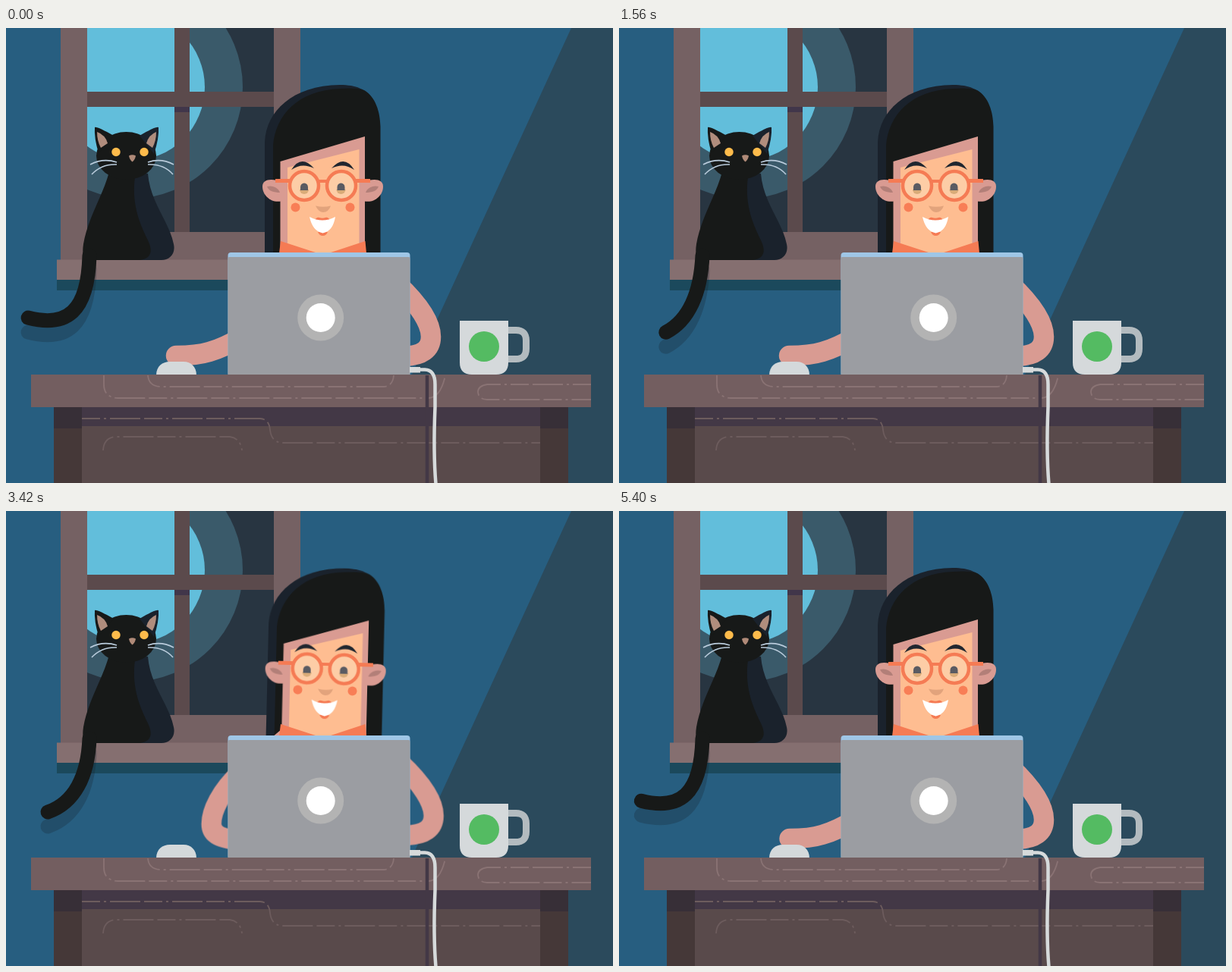
An HTML page for the animation above (5430 ms loop, 800 by 600 pixels).

```html
<!DOCTYPE html>
<html lang="en">
<head>
<meta charset="utf-8">
<title>Late night at the desk</title>
<style>
  html, body { margin: 0; width: 100%; height: 100%; overflow: hidden; background: #275e80; }
  svg { display: block; width: 100vw; height: 100vh; }

  :root {
    --loop: 5430ms;
    --in: cubic-bezier(.12, 0, .39, 0);
    --out: cubic-bezier(.61, 1, .88, 1);
    /* tail poses */
    --left: path("M110 300C108 375 80 395 29 382");
    --far-left: path("M110 300C106 370 72 397 14 384");
    --near-left: path("M110 300C108 370 84 396 36 385");
    --rising: path("M110 300C104 340 85 385 58 424");
    --down: path("M110 300C106 345 106 390 109 431");
    --right: path("M109 300C103 365 140 400 182 401");
    --trail: path("M110 300C108 350 90 385 55 397");
    /* arm poses */
    --rest: path("M310 408C295 417 282 423 268 427C255 431 240 432 224 432");
    --push: path("M312 412C300 418 288 424 275 428C264 431 252 432 236 432");
    --pull: path("M310 401C296 410 279 420 263 426C248 431 232 432 216 432");
    --type: path("M310 345C283 370 271 396 271 413C271 427 283 433 308 434");
  }

  .skin { fill: #d99b92; }
  .arm { fill: none; stroke: #d99b92; stroke-width: 26.5; stroke-linecap: round; }
  .tail {
    d: var(--left); fill: none; stroke: #171918; stroke-width: 19; stroke-linecap: round;
    animation: sway var(--loop) linear infinite;
  }
  .shadow { stroke: #16242e; opacity: .27; }
  .head { transform-origin: 415px 365px; animation: tilt var(--loop) ease-in-out infinite; }
  .eyes { transform-origin: 417px 214px; animation: blink var(--loop) linear infinite; }
  .mouse { animation: slide var(--loop) ease-in-out infinite; }
  .shoulder { animation: lift var(--loop) ease-in-out infinite; }
  .arm.l {
    d: var(--rest);
    animation: reach var(--loop) ease-in-out infinite, tapL var(--loop) ease-in-out infinite;
  }
  .arm.r { animation: tapR var(--loop) ease-in-out infinite; }

  @keyframes sway {
    0% { d: var(--left); animation-timing-function: var(--in); }
    6.5% { d: var(--rising); }
    9.8% { d: var(--down); animation-timing-function: var(--out); }
    17.1% { d: var(--right); animation-timing-function: var(--in); }
    24.9% { d: var(--down); }
    29.3% { d: var(--trail); animation-timing-function: var(--out); }
    33.3% { d: var(--far-left); animation-timing-function: var(--in); }
    39.2% { d: var(--rising); }
    42.3% { d: var(--down); animation-timing-function: var(--out); }
    49.7% { d: var(--right); animation-timing-function: var(--in); }
    57.3% { d: var(--down); }
    63% { d: var(--trail); animation-timing-function: var(--out); }
    66.3% { d: var(--near-left); animation-timing-function: var(--in); }
    71.6% { d: var(--rising); }
    74.6% { d: var(--down); animation-timing-function: var(--out); }
    84.5% { d: var(--right); animation-timing-function: var(--in); }
    92.1% { d: var(--down); }
    96.3% { d: var(--trail); animation-timing-function: var(--out); }
    100% { d: var(--left); }
  }
  @keyframes tilt {
    0%, 42.5%, 73.4%, 100% { transform: rotate(0deg); }
    49.2% { transform: rotate(1.5deg); }
    52.5% { transform: rotate(1.65deg); }
    63% { transform: rotate(1.35deg); }
  }
  @keyframes blink {
    0%, 13%, 16%, 100% { transform: scaleY(1); }
    14%, 15% { transform: scaleY(.1); }
  }
  @keyframes slide {
    0%, 12%, 29%, 100% { transform: translateX(0); }
    17.5%, 20.5% { transform: translateX(10px); }
  }
  @keyframes lift {
    0%, 43%, 100% { transform: translateY(10px); }
    49%, 95% { transform: translateY(0); }
  }
  @keyframes reach {
    0%, 12%, 29%, 100% { d: var(--rest); }
    17.5%, 20.5% { d: var(--push); }
    39.2%, 42.5% { d: var(--pull); }
    49.2% { d: var(--type); }
    95% { d: var(--type); animation-timing-function: var(--out); }
  }
  @keyframes tapL {
    0%, 56.1%, 62.3%, 68.5%, 74.7%, 80.9%, 100% { transform: translate(0, 0); }
    59.2%, 65.4%, 71.6%, 77.8% { transform: translate(-3px, -4px); }
  }
  @keyframes tapR {
    0%, 53%, 59.2%, 65.4%, 71.6%, 77.8%, 84%, 100% { transform: translate(0, 0); }
    56.1%, 62.3%, 68.5%, 74.7%, 80.9% { transform: translate(4px, -6px); }
  }
</style>
</head>
<body>
<svg viewBox="0 0 800 600">
  <defs>
    <clipPath id="glass"><path d="M107 0H353V269H107z"/></clipPath>
    <g id="ear">
      <path class="skin" d="M364 203C350 198 338 199 338 209C338 221 350 232 364 228z"/>
      <path fill="#b27f78" d="M344 209C352 207 359 211 361 217C353 217 346 215 344 209z"/>
    </g>
    <g id="lens">
      <circle cx="393" cy="208" r="19" fill="#fdcda6" stroke="#f57b54" stroke-width="4.5"/>
      <path fill="#f57b54" d="M355 199H376V204H355z"/>
      <path fill="#20262f" d="M376 187Q389 166 406 185Q390 177 376 187z"/>
      <circle cx="381.5" cy="236.500" r="6" fill="#f87e56"/>
    </g>
    <g id="eye">
      <path fill="#d9ab78" d="M387 213H399A6 6 0 0 1 387 213z"/>
      <path fill="#5a5b62" d="M388 214V210A5 5.500 0 0 1 398 210V214z"/>
    </g>
  </defs>

  <!-- room -->
  <path fill="#275e80" d="M0 0H800V600H0z"/>
  <path fill="#2b4a5c" d="M745 0H800V600H469z"/>

  <!-- window -->
  <path fill="#756163" d="M72 0H388V306H72z"/>
  <g clip-path="url(#glass)">
    <path fill="#283541" d="M107 0H353V269H107z"/>
    <circle cx="165" cy="78" r="147" fill="#3a5a6a"/>
    <circle cx="165" cy="78" r="97" fill="#62bedb"/>
    <path fill="#5b4a4c" d="M222 0H242V269H222zM107 84H353V104H107z"/>
    <path fill="#41364a" d="M222 104H242V111H222z"/>
  </g>
  <path fill="#1b495c" d="M67 331H394V346H67z"/>
  <path fill="#856f70" d="M67 305.500H394V332H67z"/>

  <!-- cat -->
  <path class="tail shadow" transform="translate(0 19)"/>
  <path fill="#1a222c" d="M165 188L187 192C190 230 215 255 221 285C224 298 215 306 205 306H150z"/>
  <path fill="#171918" d="M136 190C126 225 108 250 102 285C100 298 102 306 110 306H177C193 304 193 292 187 280C172 250 165 225 171 190z"/>
  <path class="tail"/>
  <ellipse cx="158.500" cy="168.500" rx="39.500" ry="31.500" fill="#171918"/>
  <path fill="#171918" d="M117 131Q119 129 142 142L122 165Q116 145 117 131z"/>
  <path fill="#1a222c" d="M201 131Q198 129 176 142L195 166Q202 145 201 131z"/>
  <path fill="#b08d7d" d="M120 137Q131 141 134 152L125 158Q120 149 120 137z"/>
  <path fill="#b08d7d" d="M198 137Q188 141 185 152L193 158Q198 149 198 137z"/>
  <circle cx="145" cy="163.500" r="5.700" fill="#fdbb4b"/>
  <circle cx="182" cy="163.500" r="5.700" fill="#fdbb4b"/>
  <path fill="#b08a78" d="M162 168.500Q166.500 166 171 168.500Q170 174 166.500 176.500Q163 174 162 168.500z"/>
  <path fill="none" stroke="#b9cbdb" stroke-width="1.600" d="M146 177Q128 171 111 180M146 180Q126 179 113 193M187 177Q204 171 221 180M187 180Q208 179 220 193"/>

  <!-- woman -->
  <g class="head">
    <path fill="#1a222c" d="M341 320V150C343 110 377 76 440 75C462 75 474 81 482 92V320z"/>
    <path fill="#171918" d="M352 320V155C355 115 385 82 440 80C452 79 464 79 472 82C487 91 493 110 493.500 130V320z"/>
    <path class="skin" d="M361.500 176L473 143V320H361.500z"/>
    <path fill="#febd91" d="M371 184L465.500 160V320H371z"/>
    <use href="#ear"/>
    <use href="#ear" transform="matrix(-1 0 0 1 835 0)"/>
    <use href="#lens"/>
    <use href="#lens" transform="matrix(-1 0 0 1 835 0)"/>
    <path fill="none" stroke="#f57b54" stroke-width="4" d="M412 202H423"/>
    <g class="eyes">
      <use href="#eye"/>
      <use href="#eye" x="48.500"/>
    </g>
    <path fill="#e2a37c" d="M408 234.500Q418 237 428 234.500Q425 243 418 243Q412 243 408 234.500z"/>
    <path fill="#f57b54" d="M407 254Q409 249 413 250Q417 251.500 421 250Q425 249 427 254zM411 269H424Q422 274 417.500 274Q413 274 411 269z"/>
    <path fill="#fff" d="M400 249Q417 258 434 249Q431 268 417.500 270.500Q404 268 400 249z"/>
  </g>
  <path class="skin shoulder" d="M351 298L363 288V298z"/>
  <path fill="#f57b54" d="M362 281L411 297H360zM473.500 281L425 297H475z"/>
  <path class="arm l"/>
  <path class="arm r" d="M515 337C545 365 560 390 560 407C560 424 548 432 525 433"/>

  <!-- laptop -->
  <rect x="292.500" y="296" width="240" height="163" rx="4" fill="#9fc6e6"/>
  <path fill="#9b9da2" d="M292.500 304Q292.500 302 294.500 302H530.500Q532.500 302 532.500 304V458H292.500z"/>
  <circle cx="414.700" cy="382" r="30.500" fill="#b3b3b3"/>
  <circle cx="414.700" cy="382" r="19" fill="#fff"/>

  <path class="mouse" fill="#d4d9db" d="M198 458C198 446 206 440 216 440H234C244 440 251 447 251 458z"/>

  <!-- mug -->
  <path fill="none" stroke="#b3bbbf" stroke-width="9" d="M658 398.500H672Q685.500 398.500 685.500 412V423Q685.500 436.500 672 436.500H658"/>
  <path fill="#d5d9db" d="M598 386H662V441Q662 457 646 457H614Q598 457 598 441z"/>
  <circle cx="630" cy="420" r="20" fill="#54bb62"/>

  <!-- desk -->
  <path fill="#594a4b" d="M100 500H704V600H100z"/>
  <path fill="#433846" d="M100 500H704V525H100z"/>
  <path fill="#453838" d="M63 500H100V600H63zM704 500H741V600H704z"/>
  <path fill="#372f37" d="M63 500H100V528H63zM704 500H741V528H704z"/>
  <path fill="#735e60" d="M33 457H771V500H33z"/>
  <g fill="none" stroke-width="1.800" stroke-dasharray="24 5 3 5 40 5">
    <path stroke="#8a7374" d="M129 458V470Q129 487 147 488H557Q573 487 579 458M187 458Q188 472 203 473H498Q510 472 511 458M771 470H634Q622 472 622 480Q623 490 634 490H771"/>
    <path stroke="#6d5c5d" d="M100 515H335Q347 516 348 530Q350 547 365 547H704M128 557Q129 540 145 539H295Q309 541 311 557"/>
  </g>

  <!-- cable -->
  <path fill="none" stroke="#433846" stroke-width="4.500" d="M555 458V600"/>
  <path fill="#d6dadb" d="M532 447H546V454.500H532z"/>
  <path fill="none" stroke="#d6dadb" stroke-width="4.500" d="M545 450.500H552Q565.500 451 565.500 470V500Q563 560 566.500 601"/>
</svg>
</body>
</html>
```
